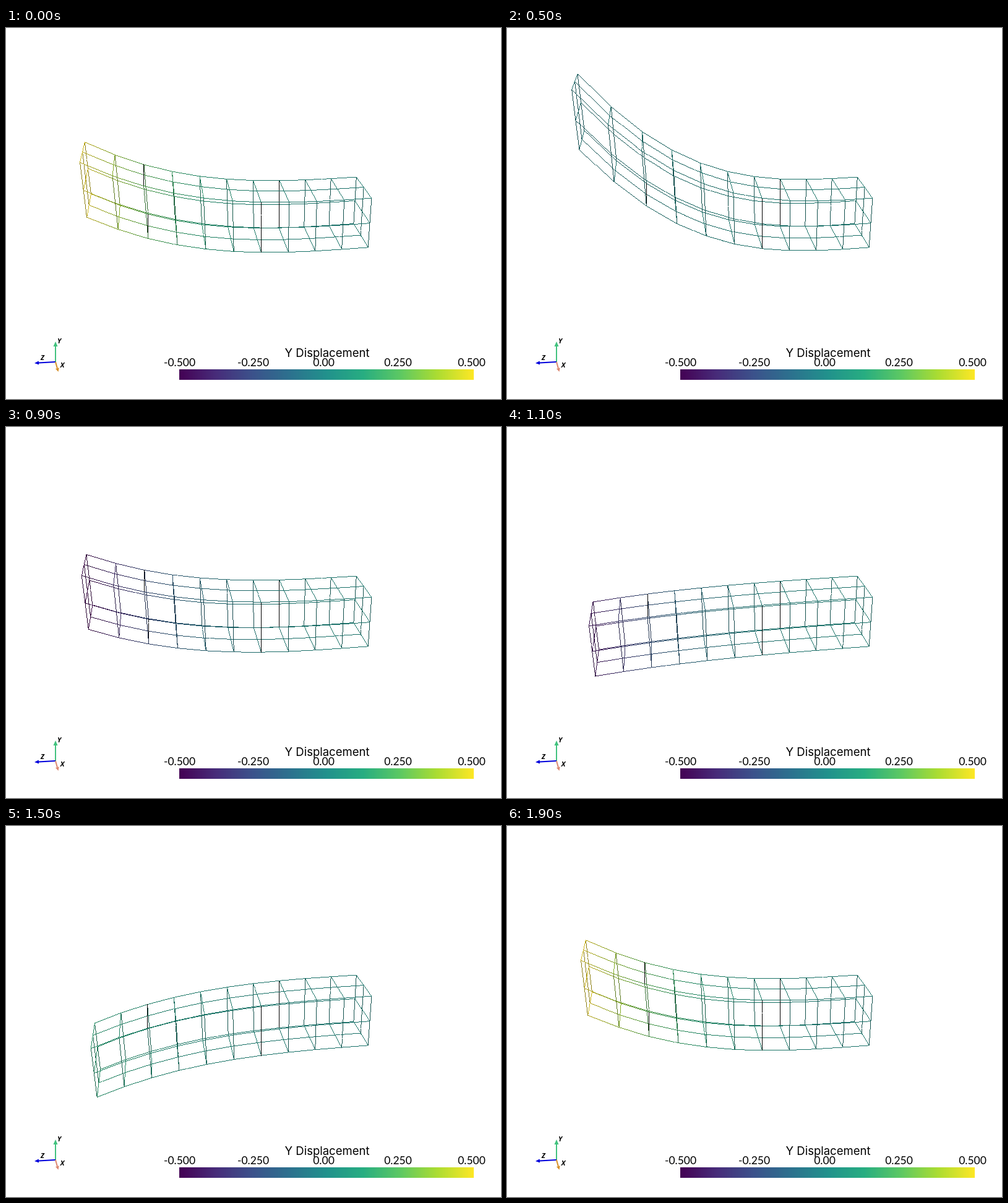
Recreate the animation shown at these times as an HTML page with a canvas. Size 800 by 600 pixels, loop 2 s.

```html
<!DOCTYPE html>
<html lang="en">
<head>
<meta charset="utf-8">
<title>Beam vibration</title>
<style>
  html, body { margin: 0; width: 100%; height: 100%; overflow: hidden; background: #fff; }
  canvas { display: block; }
</style>
</head>
<body>
<canvas id="stage" width="800" height="600"></canvas>
<script>
const ctx = document.getElementById('stage').getContext('2d');
const STEPS = 20, STEP_MS = 100;

const dot = (a, b) => a[0] * b[0] + a[1] * b[1] + a[2] * b[2];
const sub = (a, b) => a.map((v, i) => v - b[i]);
const unit = a => a.map(v => v / Math.hypot(...a));
const cross = (a, b) => [
  a[1] * b[2] - a[2] * b[1],
  a[2] * b[0] - a[0] * b[2],
  a[0] * b[1] - a[1] * b[0]
];
const mix = (a, b, t) => a + (b - a) * t;

// Perspective camera with a 30 degree vertical view angle
const eye = [11.9151, 6.1139, 3.6125], focus = [0, 0.375, 2];
const up = [-0.42546, 0.90242, -0.0679];
const back = unit(sub(eye, focus));
const right = cross(up, back);
const focal = 300 / Math.tan(Math.PI / 12);

function project(point) {
  const rel = sub(point, eye);
  const view = [dot(rel, right), dot(rel, up), dot(rel, back)];
  const scale = focal / -view[2];
  return { view, x: 400 + view[0] * scale, y: 300 - view[1] * scale };
}

// Viridis colour map
const viridis = [
  [68, 1, 84], [71, 44, 122], [59, 82, 139], [44, 113, 142], [33, 145, 140],
  [39, 173, 129], [92, 200, 99], [170, 220, 50], [253, 231, 37]
];
function mapColor(t) {
  const pos = Math.min(Math.max(t, 0), 1) * 8, i = Math.min(Math.floor(pos), 7);
  return viridis[i].map((v, c) => mix(v, viridis[i + 1][c], pos - i));
}
const css = (color, shade = [1, 1, 1]) =>
  `rgb(${color.map((v, c) => Math.round(v * Math.min(shade[c], 1))).join(',')})`;

// Lights in view space: direction, intensity, tint
const lights = [
  [[0.112, 0.766, 0.633], 0.75, [1, 0.97, 0.9]],
  [[0, -0.966, 0.259], 0.25, [0.93, 0.95, 1]],
  [[0, 0, 1], 0.25, [1, 1, 1]],
  [[0.94, 0, -0.342], 0.214, [1, 1, 1]],
  [[-0.94, 0, -0.342], 0.214, [1, 1, 1]]
];
function lineShade(a, b) {
  if (Math.abs(b.x - a.x) < 0.009 * Math.abs(b.y - a.y)) return [0, 0, 0];
  const [x, y, z] = unit(sub(b.view, a.view));
  const normal = unit([-x * z, -y * z, x * x + y * y]);
  return [0, 1, 2].map(c => lights.reduce((sum, [dir, power, tint]) =>
    sum + power * tint[c] * Math.max(0, dot(normal, dir)), 0));
}

// Surface edges of a 2 x 2 x 10 cell beam, as pairs of grid indices
const edges = [];
const limits = [2, 2, 10];
for (let i = 0; i <= 2; i++)
  for (let j = 0; j <= 2; j++)
    for (let k = 0; k <= 10; k++)
      for (let axis = 0; axis < 3; axis++) {
        const from = [i, j, k], to = [i, j, k];
        to[axis]++;
        const onSurface = from.some((v, n) => n !== axis && (v === 0 || v === limits[n]));
        if (to[axis] <= limits[axis] && onSurface) edges.push([from, to]);
      }

// One-pixel line without smoothing
function pixelLine(a, b) {
  const shade = lineShade(a, b);
  const count = Math.max(1, Math.round(Math.max(Math.abs(b.x - a.x), Math.abs(b.y - a.y))));
  for (let n = 0; n <= count; n++) {
    const t = n / count;
    ctx.fillStyle = css(mapColor(mix(a.value, b.value, t)), shade);
    ctx.fillRect(Math.floor(mix(a.x, b.x, t)), Math.floor(mix(a.y, b.y, t)), 1, 1);
  }
}

function drawBeam(step) {
  const wave = n => Math.cos(2 * Math.PI * n / (STEPS - 1));
  // Each step adds its own displacement to the shape reached so far
  let bend = 1;
  for (let n = 0; n <= step; n++) bend += wave(n);

  const vertex = index => {
    const [x, y, z] = index.map(v => v / 2);
    const shift = z ** 3 / 250;
    return { ...project([x, y + shift * bend, z]), value: 0.5 + shift * wave(step) };
  };
  edges.map(edge => edge.map(vertex))
    .sort(([a, b], [c, d]) => a.view[2] + b.view[2] - c.view[2] - d.view[2])
    .forEach(([a, b]) => pixelLine(a, b));
}

function text(string, x, y, font) {
  ctx.font = font;
  ctx.fillStyle = '#000';
  ctx.textAlign = 'center';
  ctx.fillText(string, x, y);
}

function drawColorBar() {
  for (let n = 0; n < 476; n++) {
    ctx.fillStyle = css(mapColor(n / 475));
    ctx.fillRect(280 + n, 552, 1, 17);
  }
  text('Y Displacement', 519, 532, '18.5px Inter, sans-serif');
  [['-0.500', 280.5], ['-0.250', 399.5], ['0.00', 513.5], ['0.250', 633.5], ['0.500', 752.5]]
    .forEach(([label, x]) => text(label, x, 546.5, '17.5px Lato, sans-serif'));
}

function arrow(color, x, y, headLength, headWidth) {
  const length = Math.hypot(x, y);
  ctx.save();
  ctx.translate(80, 540);
  ctx.rotate(Math.atan2(y, x));
  ctx.fillStyle = color;
  ctx.fillRect(0, -1, length - headLength, 2);
  ctx.beginPath();
  ctx.moveTo(length, 0);
  ctx.lineTo(length - headLength, -headWidth);
  ctx.lineTo(length - headLength, headWidth);
  ctx.fill();
  ctx.restore();
}

function drawAxes(step) {
  const warm = step % (STEPS - 1) === 0 ? '#d69028' : '#dc8872';
  arrow('#42c27e', 0, -33, 8, 3.5);
  arrow('#0000dc', -34, 2, 7, 3);
  arrow(warm, 4.5, 16, 6, 3);
  const font = 'italic bold 11px "Open Sans", sans-serif';
  text('Y', 86, 510, font);
  text('Z', 59, 537, font);
  text('X', 91, 548.5, font);
}

let shown = -1;
function tick() {
  const step = Math.floor(performance.now() / STEP_MS) % STEPS;
  if (step !== shown) {
    shown = step;
    ctx.fillStyle = '#fff';
    ctx.fillRect(0, 0, 800, 600);
    drawBeam(step);
    drawColorBar();
    drawAxes(step);
  }
  requestAnimationFrame(tick);
}
tick();
</script>
</body>
</html>
```
